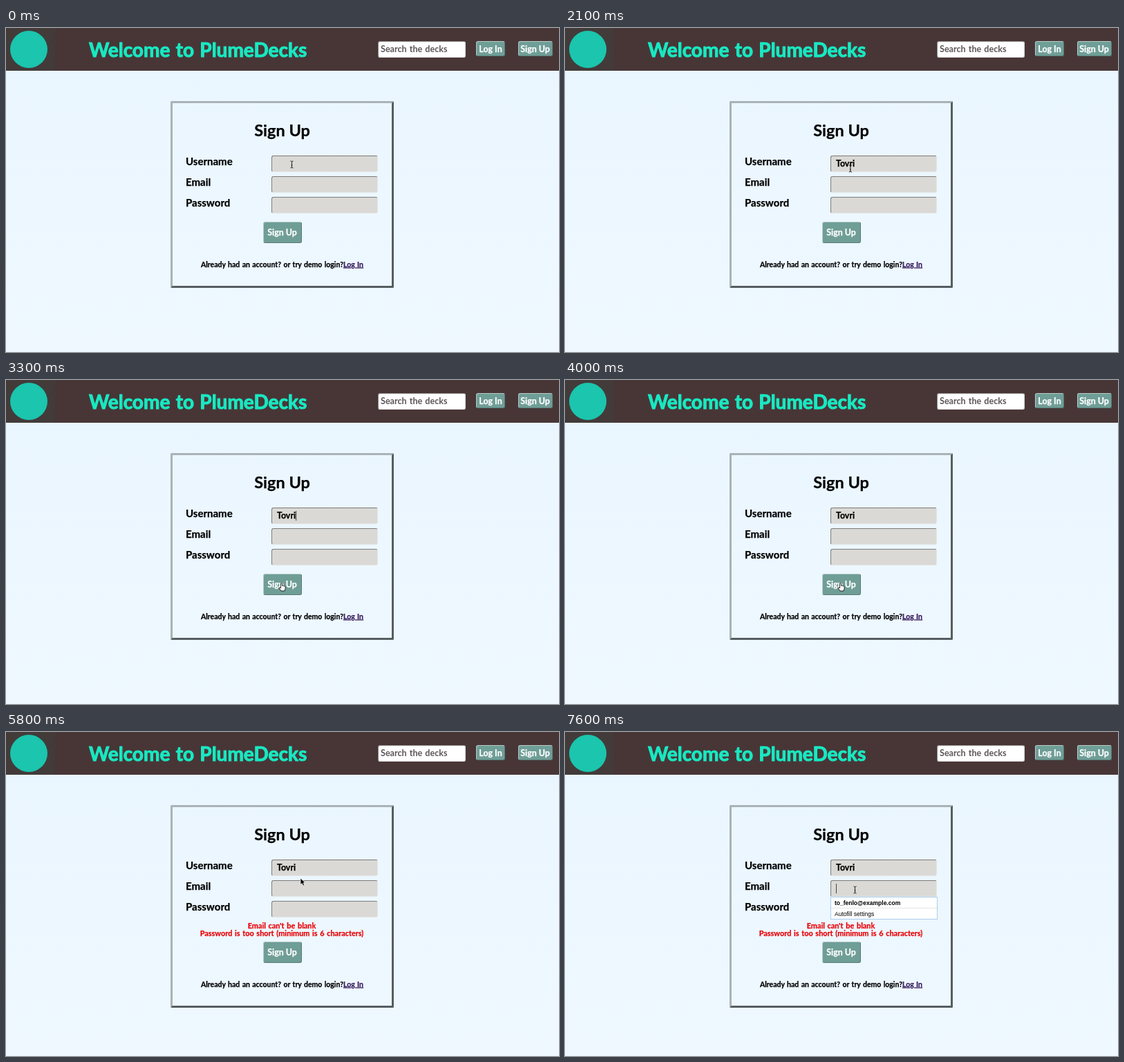
These frames come from a looping animation (800x470 px, 8 s). An HTML page:

```html
<!DOCTYPE html>
<html lang="en">
<head>
<meta charset="utf-8">
<title>Sign Up</title>
<style>
html, body { margin: 0; width: 100%; height: 100%; overflow: hidden; }
#stage {
  position: relative; width: 800px; height: 470px; overflow: hidden;
  background: linear-gradient(#eaf6ff 62px, #eff8ff);
}
#stage div, svg { position: absolute; box-sizing: border-box; }
svg { left: 0; top: 0; }
.head { left: 0; top: 0; width: 800px; height: 62px; background: linear-gradient(90deg, #423b3a 71px, #483637 0); }
.logo { left: 6px; top: 4px; width: 54px; height: 54px; border-radius: 50%; background: #1bc5ae; }
.field, .btn { border: 1px solid; border-radius: 3px; }
.field { left: 384px; width: 154px; height: 24px; background: #dad9d5; border-color: #7b7c7b #e4e5e4 #e4e5e4 #7b7c7b; }
.search { left: 538px; top: 19px; width: 127px; height: 24px; background: #fff; border-color: #8a8585 #d5d3d3 #d5d3d3 #8a8585; }
.btn { background: #6f9e97; border-color: #b5cbc8 #567a75 #567a75 #b5cbc8; }
.box { left: 238px; top: 106px; width: 323px; height: 271px; border: 3px solid; border-radius: 2px; border-color: #a9b2b6 #555d60 #555d60 #a9b2b6; }
.err .box { height: 294px; }
.err .low { transform: translateY(23px); }
.menu { left: 384px; top: 238.5px; width: 155px; height: 33px; background: #fff; border: 1px solid #a9cdec; }
.menu::after { content: ""; position: absolute; left: 0; right: 0; top: 15.5px; height: 1px; background: #e4e4e4; }
.msg, .pop { visibility: hidden; }
.err .msg, .open .pop { visibility: visible; }
text {
  font: 700 12.4px Lato, "Open Sans", sans-serif;
  stroke: currentColor; stroke-width: .25px; stroke-linejoin: round; fill: currentColor; color: #000;
}
.mid { text-anchor: middle; }
.title { font-size: 28px; word-spacing: 1.5px; color: #18e9c2; stroke-width: 1px; }
.h { font-size: 23.5px; }
.label { font-size: 15px; }
.hint { font-size: 12.6px; word-spacing: 1px; color: #5c5557; stroke: none; }
.white { color: #fff; }
.small { font-size: 10.5px; word-spacing: .8px; }
.link { fill: #3d2260; stroke: #3d2260; text-decoration: underline; }
.msg { font-size: 10.9px; word-spacing: 1px; color: #e80408; }
text.pop { font: 8.5px "Liberation Sans", Arial, sans-serif; stroke: none; }
text.strong { font-weight: 700; }
#caret { fill: #444; }
</style>
</head>
<body>
<div id="stage">
  <div class="head"></div>
  <div class="logo"></div>
  <div class="field search"></div>
  <div class="btn" style="left:680px;top:19px;width:42px;height:22px"></div>
  <div class="btn" style="left:741px;top:19px;width:50px;height:22px"></div>
  <div class="box"></div>
  <div class="field" style="top:185px"></div>
  <div class="field" style="top:215px"></div>
  <div class="field" style="top:245px"></div>
  <div class="btn low" style="left:372px;top:281px;width:56px;height:31px"></div>
  <div class="menu pop"></div>
  <svg width="800" height="470">
    <text class="title" x="120" y="42">Welcome to PlumeDecks</text>
    <text class="hint" x="542" y="35">Search the decks</text>
    <text class="white mid" x="701" y="35">Log In</text>
    <text class="white mid" x="765.5" y="35">Sign Up</text>
    <text class="h mid" x="399.5" y="156.5">Sign Up</text>
    <text class="label" x="260" y="199">Username</text>
    <text class="label" x="260" y="229">Email</text>
    <text class="label" x="260" y="259">Password</text>
    <text id="name" x="392" y="201"></text>
    <text class="msg mid" x="399" y="284.5">Email can't be blank</text>
    <text class="msg mid" x="399" y="296">Password is too short (minimum is 6 characters)</text>
    <g class="low">
      <text class="white mid" x="399.5" y="301">Sign Up</text>
      <text class="small mid" x="399.5" y="346.5">Already had an account? or try demo login?<tspan class="link">Log In</tspan></text>
    </g>
    <text class="pop strong" x="390" y="251">to_fenlo@example.com</text>
    <text class="pop" x="390" y="267">Autofill settings</text>
    <rect id="caret" width="1" height="14"/>
    <g id="pointer">
      <path id="beam" d="M-2-5Q0-5 0-3.5Q0-5 2-5M0-4V4M-2 5Q0 5 0 3.5Q0 5 2 5M-1 1H1" fill="none" stroke="#222"/>
      <path id="arrow" d="M0 0V9.5L2.2 7.5L3.8 11L5.6 10.2L4.1 6.8H7Z" stroke="#fff" stroke-width=".7"/>
      <path id="hand" d="M-1 1Q0-1 1 1V4.5Q2 3.7 2.8 4.8Q3.9 4.2 4.4 5.3Q5.6 5 5.6 6.4V8.5L4.6 12H-.6L-3.6 7.8Q-3.4 6.2-1 7.8Z" fill="#fff" stroke="#111" stroke-width=".9"/>
    </g>
  </svg>
</div>
<script>
const $ = id => document.getElementById(id);
const stage = $("stage"), nameText = $("name"), caret = $("caret"), pointer = $("pointer");
const NAME = "Tovri", LOOP = 8000, STEP = 100;
const keyTimes = [700, 800, 1000, 1100, 1200];
// time, x, y
const path = [
  [0, 413.5, 198], [2000, 413.5, 198], [2400, 411, 222], [2800, 402.5, 280.5],
  [3100, 398.5, 294], [4500, 398.5, 294], [4700, 396.5, 299.5], [5400, 396.5, 299.5],
  [5800, 426, 212], [5900, 426, 212], [6300, 419.5, 229], [LOOP, 419.5, 229]
];

function pointerAt(t) {
  const i = path.findIndex(p => p[0] > t);
  const [t0, x0, y0] = path[i - 1], [t1, x1, y1] = path[i];
  const k = (t - t0) / (t1 - t0);
  return [x0 + (x1 - x0) * k, y0 + (y1 - y0) * k];
}

function shapeAt(t, y) {
  if ([185, 215, 245].some(top => y > top && y < top + 23)) return "beam";
  return t < 4600 && y > 282 ? "hand" : "arrow";
}

const show = (el, on) => el.style.display = on ? "" : "none";

function draw(t) {
  const typed = NAME.slice(0, keyTimes.filter(k => k <= t).length);
  if (nameText.textContent !== typed) nameText.textContent = typed;

  const inName = t >= 400 && t < 4200, inEmail = t >= 7500;
  const blinkOn = t < 1200 || (t - 1200) % 1000 < 500;
  show(caret, inEmail || inName && blinkOn);
  caret.setAttribute("x", inEmail ? 392 : 392 + (typed ? nameText.getComputedTextLength() : 0));
  caret.setAttribute("y", inEmail ? 220 : 190);

  stage.classList.toggle("err", t >= 5200);
  stage.classList.toggle("open", inEmail);

  const [x, y] = pointerAt(t), shape = shapeAt(t, y);
  show(pointer, t < 700 || t >= 2000);
  pointer.setAttribute("transform", `translate(${x} ${y})`);
  for (const id of ["beam", "arrow", "hand"]) show($(id), id === shape);
}

const start = performance.now();
function tick() {
  const t = (performance.now() - start) % LOOP;
  draw(Math.floor(t / STEP) * STEP);
  requestAnimationFrame(tick);
}
tick();
</script>
</body>
</html>
```
